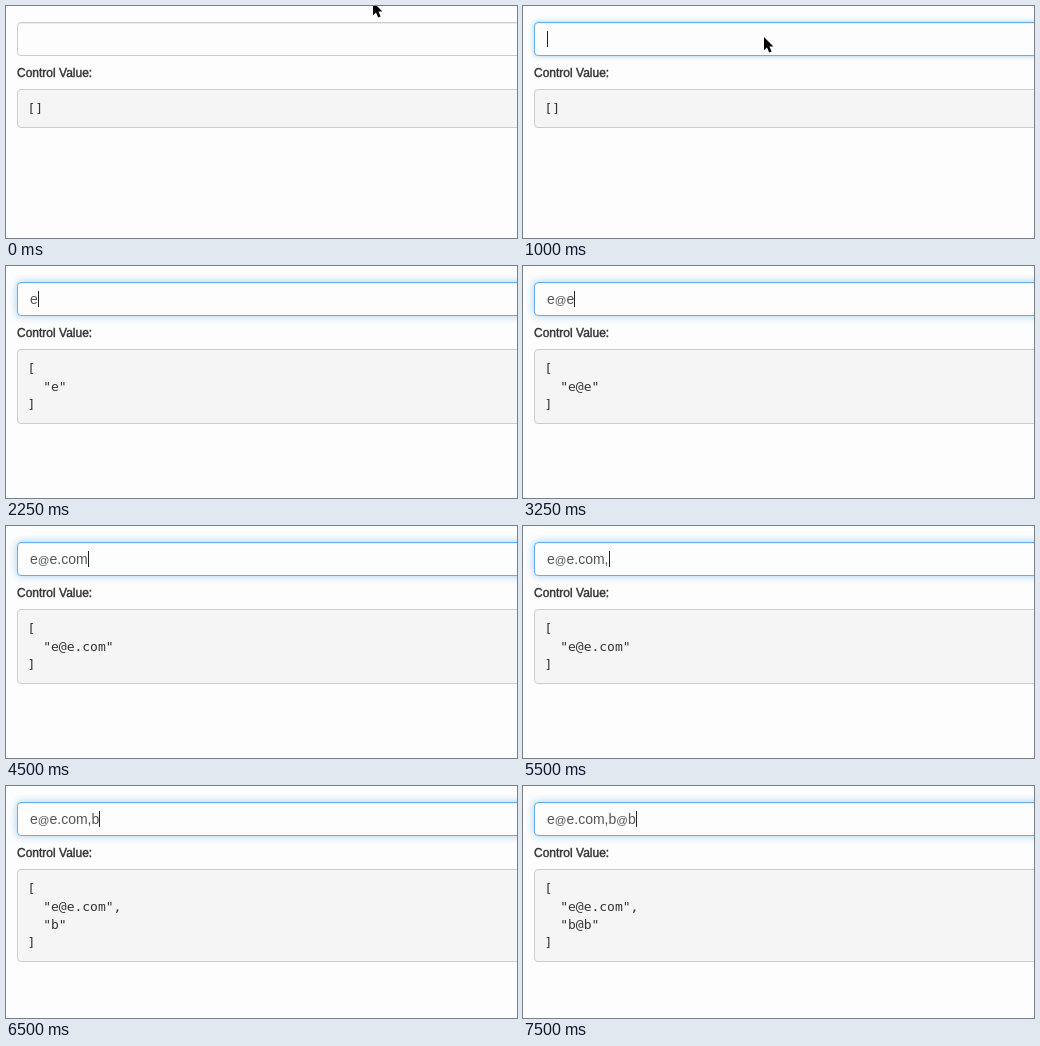
These frames come from a looping animation (511 by 232 pixels, 8000 ms). An HTML page:

```html
<!DOCTYPE html>
<html lang="en">
<head>
<meta charset="utf-8">
<title>Control value</title>
<style>
  html, body { margin: 0; width: 100%; height: 100%; overflow: hidden; background: #fdfdfd; }
  body { position: relative; font-family: "Liberation Sans", Arial, sans-serif; }
  body > * { position: absolute; box-sizing: border-box; margin: 0; }
  .field {
    left: 11px; top: 16px; width: 540px; height: 34px; padding-left: 12px;
    border: 1px solid #ccc; border-radius: 4px; background: #fdfdfd;
    box-shadow: inset 0 1px 1px rgba(0, 0, 0, .075);
    color: #555; font-size: 14px; line-height: 32px; white-space: pre;
  }
  .field.focus {
    border-color: #66afe9;
    box-shadow: inset 0 1px 1px rgba(0, 0, 0, .075), 0 0 var(--glow) rgba(102, 175, 233, .6);
  }
  .field small { font-size: 11.5px; }
  .caret { display: inline-block; width: 1px; height: 16px; vertical-align: -3px; background: #222; }
  .label {
    left: 11px; top: 59px; color: #333; font-size: 12px; line-height: 16px;
    white-space: nowrap; -webkit-text-stroke: .4px #333;
  }
  .value {
    left: 11px; top: 83px; width: 540px; padding: 9.5px;
    border: 1px solid #ccc; border-radius: 4px; background: #f5f5f5;
    color: #333; font: 13px/18px "DejaVu Sans Mono", monospace;
  }
  .pointer { left: 0; top: 0; width: 12px; height: 18px; }
</style>
</head>
<body>
<div class="field"><span class="text"></span><i class="caret"></i></div>
<div class="label">Control Value:</div>
<pre class="value">[]</pre>
<svg class="pointer" viewBox="0 0 12 18">
  <path d="M1 1V14.2L4 11.4L6.2 16.6L8.6 15.6L6.4 10.6H10.4Z" fill="#000" stroke="#fff" stroke-width="1" paint-order="stroke"/>
</svg>
<script>
const LOOP = 8000;
const [field, text, caret, value, pointer] =
  ['.field', '.text', '.caret', '.value', '.pointer'].map(s => document.querySelector(s));

// Each step changes only the listed properties, from its time on.
const steps = [
  [0, { typed: '', caret: false, glow: 0, pointer: [366, -5] }],
  [250, { pointer: [283, 20] }],
  [500, { pointer: [262, 31] }],
  [750, { pointer: [240, 30] }],
  [1000, { caret: true, glow: 5 }],
  [1250, { glow: 8, pointer: [465, 38] }],
  [1500, { caret: false, pointer: null }],
  [2000, { caret: true }],
  [2250, { typed: 'e' }],
  [2750, { typed: 'e@' }],
  [3250, { typed: 'e@e' }],
  [3750, { typed: 'e@e.' }],
  [4250, { caret: false }],
  [4500, { typed: 'e@e.com', caret: true }],
  [5000, { caret: false }],
  [5500, { typed: 'e@e.com,', caret: true }],
  [6000, { caret: false }],
  [6500, { typed: 'e@e.com,b', caret: true }],
  [6750, { typed: 'e@e.com,b@' }],
  [7250, { caret: false }],
  [7500, { typed: 'e@e.com,b@b', caret: true }]
];

function stateAt(time) {
  return Object.assign({}, ...steps.filter(([start]) => start <= time).map(([, change]) => change));
}

function render(state) {
  text.innerHTML = state.typed.replace(/@/g, '<small>@</small>');
  value.textContent = JSON.stringify(state.typed.split(',').filter(Boolean), null, 2);
  caret.style.visibility = state.caret ? 'visible' : 'hidden';
  field.classList.toggle('focus', state.glow > 0);
  field.style.setProperty('--glow', state.glow + 'px');
  pointer.style.display = state.pointer ? 'block' : 'none';
  if (state.pointer) {
    const [x, y] = state.pointer;
    pointer.style.transform = `translate(${x}px, ${y}px)`;
  }
}

function tick() {
  render(stateAt(performance.now() % LOOP));
  requestAnimationFrame(tick);
}
tick();
</script>
</body>
</html>
```
